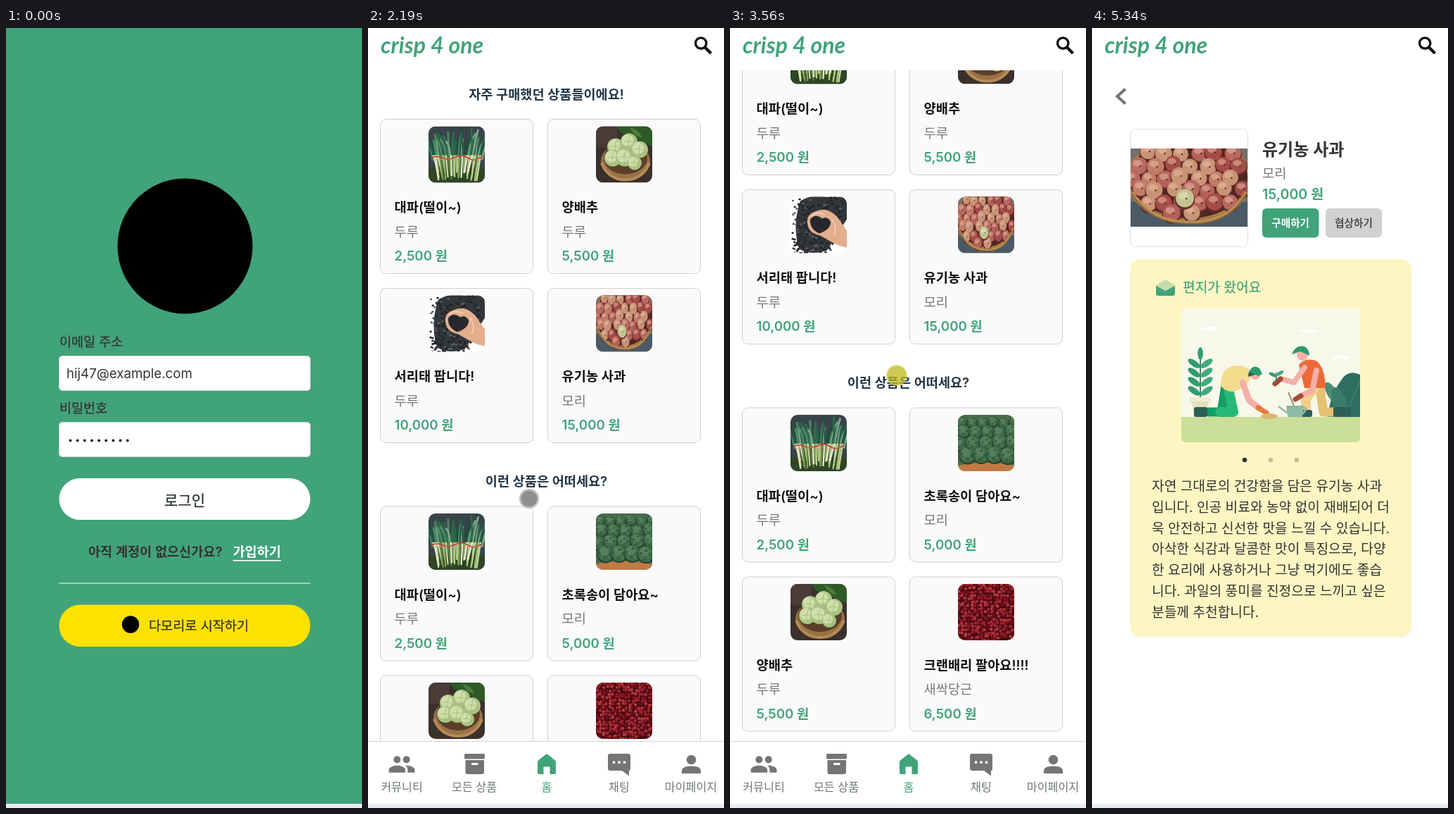
An HTML page that plays this animation: 506x1107 px, repeating every 5.74 s.

```html
<!DOCTYPE html>
<html lang="ko">
<head>
<meta charset="utf-8">
<title>장보기 앱</title>
<style>
html, body { margin: 0; width: 100%; height: 100%; overflow: hidden; background: #fff; }
svg { display: block; width: 100vw; height: 100vh; }
text { font-family: Inter, "Noto Sans CJK KR", "Noto Sans CJK JP", sans-serif; white-space: pre; }
.mark { font-family: Lato, sans-serif; font-style: italic; }
</style>
</head>
<body>
<svg id="stage" viewBox="0 0 506 1107" xmlns="http://www.w3.org/2000/svg"></svg>
<script>
const LOOP = 5740, GREEN = '#41a37a', GREY = '#777', INK = '#333';

// ---------- markup helpers ----------
function rng(seed) {
  return () => {
    seed = (seed + 0x6D2B79F5) | 0;
    let r = Math.imul(seed ^ seed >>> 15, 1 | seed);
    r = r + Math.imul(r ^ r >>> 7, 61 | r) ^ r;
    return ((r ^ r >>> 14) >>> 0) / 4294967296;
  };
}
const rect = (x, y, w, h, fill, r = 0, more = '') =>
  `<rect x="${x}" y="${y}" width="${w}" height="${h}" rx="${r}" fill="${fill}" ${more}/>`;
const oval = (x, y, rx, ry, fill, more = '') =>
  `<ellipse cx="${x}" cy="${y}" rx="${rx}" ry="${ry}" fill="${fill}" ${more}/>`;
const dot = (x, y, r, fill, more) => oval(x, y, r, r, fill, more);
const shape = (d, fill, more = '') => `<path d="${d}" fill="${fill}" ${more}/>`;
const line = (d, color, w, more = '') =>
  `<path d="${d}" fill="none" stroke="${color}" stroke-width="${w}" ${more}/>`;
// weight 500 is regular with a hairline outline
function text(x, y, size, str, fill = INK, weight = 400, anchor = 'start') {
  const medium = weight === 500;
  return `<text x="${x}" y="${y}" font-size="${size}" fill="${fill}" text-anchor="${anchor}" ` +
    `font-weight="${medium ? 400 : weight}"${medium ? ` stroke="${fill}" stroke-width=".25"` : ''}>${str}</text>`;
}
const repeat = (n, fn) => Array.from({ length: n }, (_, i) => fn(i)).join('');
const group = (id, body, more = '') => `<g id="${id}" ${more}>${body}</g>`;

// ---------- produce pictures, 80 x 80 ----------
function leeks() {
  const r = rng(4), pick = a => a[r() * a.length | 0];
  const leaves = ['#2f6b4a', '#1f4f3d', '#4f8a66', '#28604c', '#7da987'];
  const stalks = ['#cfe0a0', '#86a85a', '#eef2d4', '#b7d283', '#5f7f42'];
  return rect(0, 0, 80, 80, '#39434a') + rect(0, 60, 80, 20, '#2f4526') +
    repeat(38, i => {
      const u = i - 18.5, x = 40 + u * 1.95;
      return line(`M${x} 48Q${x + u * .2} 25 ${40 + u * 2.5 + r() * 12 - 6} ${2 + r() * 20}`, pick(leaves), 2.8);
    }) +
    repeat(30, i => {
      const x = 6 + i * 2.35;
      return line(`M${x} 41L${x + (40 - x) * .2 + r() * 4 - 2} ${64 + r() * 14}`, pick(stalks), 2.1);
    }) + line('M4 45Q12 41 20 45T38 44T56 45T76 43', '#c6383b', 1.7) + line('M6 48Q24 45 40 47T74 46', '#dd8c7c', .7);
}
function cabbages() {
  const heads = [[28, 29, 12], [47, 22, 12], [24, 45, 12], [62, 33, 12], [41, 44, 13], [55, 52, 10]];
  return rect(0, 0, 80, 80, '#3a302c') + rect(0, 0, 30, 30, '#4a3b36') +
    shape('M30 0H80V28Q60 20 48 12Q36 14 30 0Z', '#2f5a28') + shape('M48 2Q60 4 66 16Q54 14 48 2Z', '#4e7f36') +
    oval(42, 50, 35, 27, '#9a7146') + oval(42, 45, 31, 23, '#5c3f29') +
    heads.map(([x, y, q]) => dot(x, y, q, '#a9c383') + dot(x - 2, y - 2, q * .7, '#cfdeab') +
      line(`M${x} ${y + q * .8}Q${x - 3} ${y} ${x + 2} ${y - q * .8}M${x - q * .6} ${y}Q${x} ${y - 3} ${x + q * .6} ${y + 2}`, '#9fbd78', .9)).join('') +
    line('M8 52Q18 76 42 76T76 52', '#b58a58', 4);
}
function beans() {
  const r = rng(9);
  return rect(0, 0, 80, 80, '#fff') + shape('M14 6Q30 -4 50 0H80V32L52 76Q30 84 12 74Q2 40 14 6Z', '#33363a') +
    repeat(230, () => {
      const y = r() * 80, x = 3 + r() * (78 - y * .3);
      return oval(x, y, 1.7, 1.4, r() < .75 ? '#222428' : '#5d6166');
    }) +
    shape('M80 48L66 28Q52 14 38 20Q22 24 24 38Q26 52 42 55L58 64Q68 70 80 72Z', '#e3ae8c') +
    shape('M45 31Q35 23 28 32Q27 46 41 52Q58 46 57 35Q52 27 45 31Z', '#26282c') +
    line('M29 28Q38 19 49 26M59 32Q67 43 62 54', '#f2cdb3', 2);
}
function broccoli() {
  const r = rng(12);
  const bump = (x, y, q) => dot(x, y + 1, q + 1, '#223f2b') + dot(x, y, q, '#40694a') +
    dot(x - q * .2, y - q * .3, q * .6, '#567f5b') + repeat(7, i => {
      const a = i * 2.4, d = q * (.4 + r() * .45);
      return dot(x + Math.cos(a) * d, y + Math.sin(a) * d, q * .16, i % 2 ? '#4d7a52' : '#335b3d');
    });
  const row = (n, x, y, step, q) => repeat(n, i => bump(x + i * step, y + r() * 5, q));
  return rect(0, 0, 80, 80, '#4c6b4c') + shape('M0 72Q40 64 80 72V80H0Z', '#c07a44') +
    row(6, 5, 8, 15, 7) + row(5, 8, 22, 17, 9) + row(5, 2, 37, 19, 10) + row(4, 14, 56, 19, 11.5);
}
function berries() {
  const r = rng(21), tones = ['#8e1a26', '#a02430', '#6c101b', '#b0353c'];
  return rect(0, 0, 80, 80, '#43090f') + repeat(300, i => {
    const x = (i % 18) * 4.6 + r() * 3, y = (i / 18 | 0) * 4.9 + r() * 3;
    return dot(x, y, 2.3, tones[r() * 4 | 0]) + (i % 4 ? '' : dot(x - .6, y - .7, .6, '#e58c88'));
  });
}
// 166 x 111
function apples() {
  const r = rng(33), tones = ['#b5605a', '#a44c48', '#c27c68', '#b86a60', '#c99476'];
  const apple = (x, y, q, tone, shine) => dot(x, y + 1.5, q, '#5e2a29') + dot(x, y - .5, q - 1, tone) +
    oval(x - 2, y - 4, q * .5, q * .36, shine, 'opacity=".55"') + dot(x + 2, y, 1.2, '#4e2a24');
  let out = rect(0, 0, 166, 111, '#75706a') + rect(0, 76, 166, 35, '#4a5a66') +
    oval(83, 44, 88, 62, '#a57a47') + oval(83, 41, 83, 58, '#4f2622');
  for (let row = 0; row < 6; row++) for (let k = 0; k < 8; k++) {
    const x = k * 24 + (row % 2) * 12 + r() * 6 - 3, y = 4 + row * 17.5 + r() * 5;
    if (((x - 83) / 82) ** 2 + ((y - 41) / 54) ** 2 > 1) continue;
    out += apple(x, y, 11.5 + r() * 2, tones[r() * 5 | 0], '#e8b9a0');
  }
  return out + apple(77, 71, 14, '#c3c48f', '#eaeac6') +
    line('M2 62Q25 104 83 105T164 62', '#b88c52', 5) + line('M2 64Q25 106 83 107T164 64', '#7f5a32', 1.5);
}
const pics = { leeks, cabbages, beans, broccoli, berries };

// ---------- screens ----------
function login() {
  const field = y => rect(75.5, y, 357, 49, '#fff', 4.5, 'stroke="#ced4da"');
  return rect(0, 0, 506, 1107, GREEN) + dot(254.5, 309.5, 96, '#000') +
    text(76, 452, 18.5, '이메일 주소', INK, 500) + field(465.5) + text(86, 497, 18.7, 'hij47@example.com') +
    text(76, 546, 18.5, '비밀번호', INK, 500) +
    rect(73.2, 557.2, 361.6, 53.6, 'none', 7, 'id="ring" stroke="#28734f" stroke-width="4.6"') + field(559.5) +
    repeat(9, i => dot(91.5 + i * 10.15, 585.5, 2, '#222')) + rect(176.5, 573, 1.2, 23, '#222', 0, 'id="caret"') +
    rect(75.5, 639, 357, 59, '#fff', 29.5) + text(254, 677.5, 21, '로그인', '#26332c', 500, 'middle') +
    text(117, 750, 18.6, '아직 계정이 없으신가요?', INK, 600) + text(322.5, 750, 18.6, '가입하기', '#fff', 600) +
    rect(322.5, 755, 68.5, 1.6, '#fff') + rect(75.5, 787.5, 357, 1.1, '#e9f3ee') +
    rect(75.5, 818.5, 357, 59.5, '#fbe200', 29.75) + dot(177, 846.5, 12.2, '#000') +
    text(203, 855, 18.6, '다모리로 시작하기', INK, 500);
}

function card(x, y, pic, name, seller, price) {
  return rect(x + .5, y + .5, 217, 219, '#fafafa', 8, 'stroke="#cfcfcf"') +
    `<use href="#${pic}" transform="translate(${x + 69} ${y + 10.5})"/>` +
    text(x + 20.5, y + 132, 18.7, name, '#111', 600) + text(x + 20.5, y + 166.5, 18.7, seller, GREY) +
    text(x + 20.5, y + 201, 18.7, price + ' 원', GREEN, 600);
}

function header() {
  return rect(0, 0, 506, 60, '#fff') +
    `<text class="mark" x="18" y="36" font-size="32" font-weight="700" fill="${GREEN}">crisp 4 one</text>` +
    dot(473.2, 21.6, 7.7, 'none', 'stroke="#111" stroke-width="3.4"') + line('M478.5 27L487.5 36', '#111', 4.2);
}

function nav() {
  const g = '#757575', label = (x, s, c = '#6f7775') => text(x, 1083, 16.2, s, c, 400, 'middle');
  const people = 'M16 11c1.66 0 3-1.34 3-3s-1.34-3-3-3-3 1.34-3 3 1.34 3 3 3zm-8 0c1.66 0 3-1.34 3-3s-1.34-3-3-3-3 1.34-3 3 1.34 3 3 3z' +
    'm0 2c-2.33 0-7 1.17-7 3.5V19h14v-2.5c0-2.33-4.67-3.5-7-3.5zm8 0c-.29 0-.62.02-.97.05 1.16.84 1.97 1.97 1.97 3.45V19h6v-2.5c0-2.33-4.67-3.5-7-3.5z';
  return rect(0, 1012, 506, 90, '#fff') + rect(0, 1012, 506, 1, '#d4d4d4') +
    shape(people, g, 'transform="translate(28 1025) scale(1.67)"') +
    rect(137, 1030, 29, 7.5, g, 1.5) + shape('M138.5 1039H165V1056Q165 1059 162 1059H141.5Q138.5 1059 138.5 1056Z', g) +
    rect(147, 1043, 9.5, 3, '#fff', 1) +
    shape('M254 1030L265.5 1039Q267 1040.5 267 1042V1057Q267 1059 265 1059H258.5V1048.5H249.5V1059H243Q241 1059 241 1057V1042Q241 1040.5 242.5 1039Z', GREEN) +
    shape('M344 1030H370Q373 1030 373 1033V1051Q373 1054 371 1054V1061.5L361 1054H344Q341 1054 341 1051V1033Q341 1030 344 1030Z', g) +
    [349.5, 357, 364.5].map(x => rect(x - 1.7, 1040.5, 3.4, 3.4, '#fff')).join('') +
    dot(459.5, 1038.5, 6.8, g) + shape('M446 1058V1054.5Q446 1047.5 459.5 1047.5T473 1054.5V1058Z', g) +
    label(48, '커뮤니티') + label(151, '모든 상품') + label(254, '홈', GREEN) + label(357, '채팅') + label(459, '마이페이지');
}

function home() {
  const title = (y, s) => text(253.5, y, 18.6, s, '#213547', 600, 'middle');
  const list = title(101, '자주 구매했던 상품들이에요!') +
    card(17, 129, 'leeks', '대파(떨이~)', '두루', '2,500') + card(255, 129, 'cabbages', '양배추', '두루', '5,500') +
    card(17, 369, 'beans', '서리태 팝니다!', '두루', '10,000') + card(255, 369, 'crate', '유기농 사과', '모리', '15,000') +
    title(650, '이런 상품은 어떠세요?') +
    card(17, 678.5, 'leeks', '대파(떨이~)', '두루', '2,500') + card(255, 678.5, 'broccoli', '초록송이 담아요~', '모리', '5,000') +
    card(17, 918.5, 'cabbages', '양배추', '두루', '5,500') + card(255, 918.5, 'berries', '크랜배리 팔아요!!!!', '새싹당근', '6,500');
  return rect(0, 0, 506, 1107, '#fff') + `<g clip-path="url(#view)">${group('list', list)}</g>` + header() + nav();
}

function garden() {
  const leaf = (x, y, a, l, c) => oval(x, y, l, l * .42, c, `transform="rotate(${a} ${x} ${y})"`);
  const cloud = (x, y) => shape(`M${x - 13} ${y + 3}Q${x - 8} ${y - 4} ${x - 3} ${y - 1}Q${x + 3} ${y - 5} ${x + 14} ${y + 3}Z`, '#fff');
  const skin = '#f3b0a6', dark = '#2c5f58';
  const limb = (d, c, w) => line(d, c, w, 'stroke-linecap="round" stroke-linejoin="round"');
  return rect(127, 398, 254, 190, '#f7f7ea') + cloud(167, 426) + cloud(308, 429) + cloud(354, 467) +
    shape('M335 552Q338 522 354 500Q364 484 381 492V552Z', '#2f6f62') +
    leaf(341, 518, 60, 17, '#4b8f78') + leaf(352, 531, 70, 22, '#3b7d6b') + line('M381 500L360 552', '#4b8f78', 1) +
    rect(127, 552, 254, 36, '#cbdf98') +
    line('M154 526V462', '#2b7d5b', 1.8) + leaf(154, 462, 90, 9, '#2f9c70') +
    repeat(4, i => leaf(145, 476 + i * 13, 35, 10, '#2f9c70') + leaf(163, 476 + i * 13, -35, 10, '#43ab7f')) +
    shape('M139 524H169V531H166L163 553H145L142 531H139Z', '#e4dfba') + rect(139, 524, 30, 6, '#efebcf') +
    // planter on the left
    limb('M190 508L184 545H166', '#159d66', 13) + limb('M193 508L201 545H182', '#27b87a', 14) +
    rect(145, 538, 19, 14, dark, 3) +
    shape('M183 508Q182 482 205 479Q225 479 228 494L219 506L207 514Q194 520 183 508Z', '#f3dd8d') +
    limb('M214 503L223 528L238 540', skin, 9) + limb('M236 539L248 546', '#e07b3c', 7) +
    dot(232, 492, 7, skin) + shape('M222 495Q221 486 230 485L235 491Z', dark) +
    shape('M223 488Q229 476 238 483L242 491L237 494Z', '#2d9a6c') +
    // planter on the right
    limb('M323 505L329 545H350', '#e5c172', 13) + limb('M320 506L304 526V544', '#f0d08a', 14) +
    rect(343, 538, 25, 14, dark, 3) + rect(291, 542, 22, 10, dark, 3) +
    shape('M294 478Q303 467 318 472Q331 480 332 511H302Z', '#ed6a38') +
    limb('M302 482L287 503L269 498', skin, 8) + limb('M268 498L260 505', '#a44b3b', 7) +
    limb('M319 486L313 515L295 523', skin, 8) + limb('M297 522L289 527', '#a44b3b', 7) +
    dot(299, 464, 8, skin) + shape('M284 463Q289 449 302 452Q309 456 309 465L296 459Z', '#2d9a6c') +
    line('M262 503V489', '#2b7d5b', 1.6) + leaf(257, 492, 25, 6, '#2f9c70') + leaf(267, 490, -30, 6, '#43ab7f') +
    shape('M276 536H301L299 552H278Z', '#8db9a5') + line('M277 546L265 537M300 539Q309 538 299 548', '#8db9a5', 2.6) +
    line('M287 536L279 517', '#a3937a', 2) + oval(252, 551, 12, 4, '#dbb574');
}

function detail() {
  const body = ['자연 그대로의 건강함을 담은 유기농 사과', '입니다. 인공 비료와 농약 없이 재배되어 더',
    '욱 안전하고 신선한 맛을 느낄 수 있습니다.', '아삭한 식감과 달콤한 맛이 특징으로, 다양',
    '한 요리에 사용하거나 그냥 먹기에도 좋습', '니다. 과일의 풍미를 진정으로 느끼고 싶은', '분들께 추천합니다.'];
  return rect(0, 0, 506, 1107, '#fff') + header() + line('M47.5 86.5L36 97L47.5 107.5', GREY, 4.2) +
    rect(54.5, 143.5, 167, 167, '#fff', 8, 'stroke="#dcdcdc"') +
    '<use href="#apples" transform="translate(55 171)" clip-path="url(#wide)"/>' +
    text(242, 181, 24, '유기농 사과', INK, 600) + text(242, 213, 18.7, '모리', GREY) + text(242, 243, 19.6, '15,000 원', GREEN, 600) +
    rect(242, 256, 80.5, 41.5, GREEN, 6) + text(282.2, 281.5, 14.6, '구매하기', '#fff', 600, 'middle') +
    rect(332, 256, 80, 41.5, '#d1d1d1', 6) + text(372, 281.5, 14.6, '협상하기', INK, 500, 'middle') +
    rect(54, 328.5, 400, 536, '#f7f3dc', 14) + rect(54.5, 328.5, 399, 535, '#fdf6c3', 14) +
    shape('M91 365L104.5 357L118 365V372H91Z', '#c6dcab') +
    shape('M91 366L104.5 373L118 366V377Q118 380 115 380H94Q91 380 91 377Z', GREEN) +
    text(129, 375, 19.2, '편지가 왔어요', GREEN, 500) + `<g clip-path="url(#frame)">${garden()}</g>` +
    [217, 254, 291].map((x, i) => dot(x, 613, 3.3, i ? '#c5bf98' : INK)).join('') +
    body.map((s, i) => text(85, 657 + i * 29.8, 19.2, s)).join('');
}

const clip = (id, ...r) => `<clipPath id="${id}">${rect(...r)}</clipPath>`;
const stage = document.getElementById('stage');
stage.innerHTML = '<defs>' +
  clip('tile', 0, 0, 80, 80, '#000', 10) + clip('view', 0, 60, 506, 952, '#000') +
  clip('wide', 0, 0, 166, 111, '#000') + clip('frame', 127, 398, 254, 190, '#000', 6) +
  Object.entries(pics).map(([id, fn]) => group(id, fn(), 'clip-path="url(#tile)"')).join('') +
  group('apples', apples()) +
  group('crate', `<use href="#apples" transform="scale(${80 / 166} ${80 / 111})"/>`, 'clip-path="url(#tile)"') +
  '</defs>' + group('login', login()) + group('home', home()) + group('detail', detail()) +
  rect(0, 1101, 506, 6, '#e8ecf3') +
  group('cursor', group('idle', dot(0, 0, 14, '#bcbcbc') + dot(0, 0, 11.3, '#8f8f8f')) +
    group('press', dot(0, 0, 14, '#bdb91c', 'fill-opacity=".75" stroke="#d9d54a" stroke-opacity=".5" stroke-width="1.6"')));

// ---------- motion ----------
const smooth = u => (1 - Math.cos(Math.PI * u)) / 2;
const out = p => u => 1 - (1 - u) ** p;
const accel = u => u * u;
const linear = u => u;

// keys: [time, values, easing into this key]
function track(keys, t) {
  if (t <= keys[0][0]) return keys[0][1];
  for (let i = 1; i < keys.length; i++) {
    const [t0, a] = keys[i - 1], [t1, b, ease = smooth] = keys[i];
    if (t < t1) {
      const u = ease((t - t0) / (t1 - t0));
      return a.map((v, k) => v + (b[k] - v) * u);
    }
  }
  return keys[keys.length - 1][1];
}
const pointer = [
  [160, [439, 1122]], [700, [224, 677]], [740, [224, 677]], [860, [229, 668]], [2270, [229, 668]],
  [2730, [237, 493], out(1.8)], [3580, [237, 493]], [3860, [242, 642]], [4000, [288, 604], accel],
  [4110, [348.5, 558], out(2)], [4560, [348.5, 558]], [5070, [475.5, 1038]], [5110, [475.5, 1038]],
  [5340, [475.5, 1122], accel]
];
const scroll = [
  [2270, [0]], [2730, [140], out(1.515)], [3590, [140]], [3870, [12]], [4110, [0], out(2)]
];
const press = [
  [740, [0]], [850, [1]], [970, [1]], [1090, [0]], [2190, [0]], [2265, [1]], [3870, [1]], [3940, [0]],
  [4130, [0]], [4200, [1]], [4530, [1]], [4630, [0]]
];
const focus = [[745, [0]], [865, [1], linear]];
const HOME_AT = 1100, DETAIL_AT = 4620;

const el = id => document.getElementById(id);
const show = (id, on) => el(id).setAttribute('display', on ? 'inline' : 'none');
const alpha = (id, v) => el(id).setAttribute('opacity', v);

function draw(t) {
  show('login', t < HOME_AT);
  show('home', t >= HOME_AT && t < DETAIL_AT);
  show('detail', t >= DETAIL_AT);
  const [ring] = track(focus, t), [down] = track(press, t), [x, y] = track(pointer, t);
  alpha('ring', ring);
  show('caret', t > 770);
  el('list').setAttribute('transform', `translate(0 ${-track(scroll, t)[0]})`);
  show('cursor', t > 160 && t < 5340);
  el('cursor').setAttribute('transform', `translate(${x} ${y})`);
  alpha('idle', 1 - down);
  alpha('press', down);
}
function tick() {
  draw(performance.now() % LOOP);
  requestAnimationFrame(tick);
}
tick();
</script>
</body>
</html>
```
